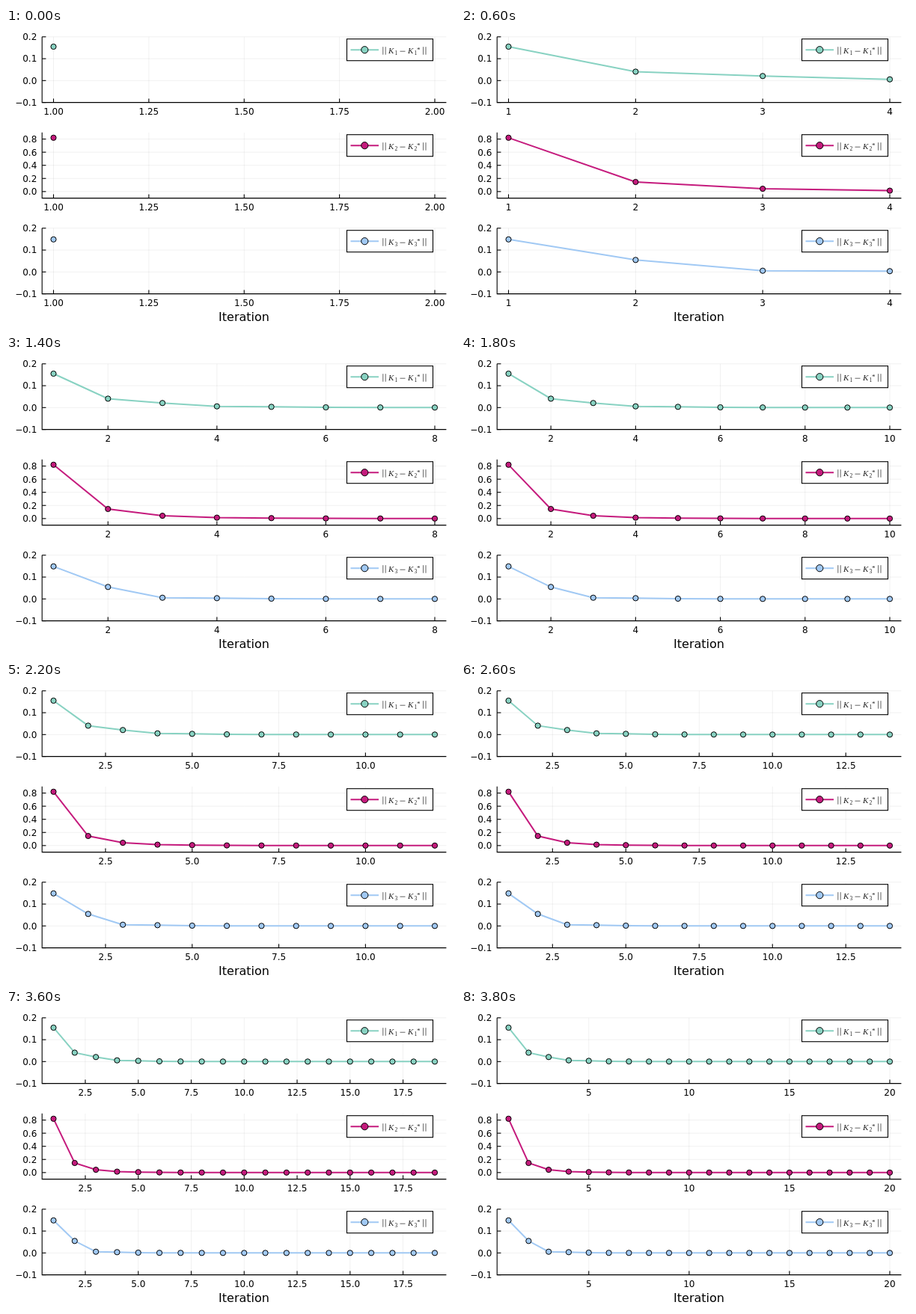
An HTML page with a canvas that plays this animation: 600 px wide and 400 px high, repeating every 4 s.

```html
<!DOCTYPE html>
<html lang="en">
<head>
<meta charset="utf-8">
<title>Convergence</title>
<style>
  html, body { margin: 0; width: 100%; height: 100%; overflow: hidden; background: #fff; }
  canvas { display: block; }
</style>
</head>
<body>
<canvas id="stage" width="600" height="400"></canvas>
<script>
const ctx = document.getElementById('stage').getContext('2d');
const LEFT = 48.2, RIGHT = 588.4, FIRST = 63.5, LAST = 573, HEIGHT = 87.8;
const STEP_MS = 200, COUNT = 20;
const LABEL = '12px "DejaVu Sans", sans-serif';
const AXIS = '#000', GRID = 'rgba(0,0,0,0.06)';

const plots = [
  { top: 11.8, color: '#88d2c2', min: -0.1, max: 0.2, ticks: [-0.1, 0, 0.1, 0.2],
    values: [0.155, 0.0407, 0.0208, 0.0056, 0.0034, 0.0011] },
  { top: 139.8, color: '#c51b7d', min: -0.1, max: 0.9, ticks: [0, 0.2, 0.4, 0.6, 0.8],
    values: [0.82, 0.146, 0.043, 0.014, 0.0068, 0.0025] },
  { top: 267.8, color: '#a1c9f4', min: -0.1, max: 0.2, ticks: [-0.1, 0, 0.1, 0.2],
    values: [0.1487, 0.0548, 0.0055, 0.0035, 0.0013, 0.0004] }
];

// Errors keep shrinking geometrically after the listed ones.
const valueAt = (values, i) => values[i] ?? values[5] * 0.5 ** (i - 5);

function tickStep(n) {
  if (n < 3) return 0.25;
  if (n < 4) return 0.5;
  if (n < 8) return 1;
  if (n < 12 || n === 15) return 2;
  if (n < 15 || n === 18 || n === 19) return 2.5;
  return n < 18 ? 3 : 5;
}

function line(points, color, width) {
  ctx.beginPath();
  points.forEach(([x, y]) => ctx.lineTo(x, y));
  ctx.strokeStyle = color;
  ctx.lineWidth = width;
  ctx.stroke();
}

function dot(x, y, r, color) {
  ctx.beginPath();
  ctx.arc(x, y, r, 0, 2 * Math.PI);
  ctx.fillStyle = color;
  ctx.fill();
  ctx.strokeStyle = '#000';
  ctx.lineWidth = 1;
  ctx.stroke();
}

function text(str, x, y, font, align = 'center', color = '#000') {
  ctx.font = font;
  ctx.textAlign = align;
  ctx.fillStyle = color;
  ctx.fillText(str, x, y);
}

function legend(top, color, index) {
  const y = top + 17.4, base = y + 4.9, ink = '#222';
  const serif = (size, style = '') => `${style} ${size}px "Liberation Serif", serif`;
  const put = (str, x, dy, font) => text(str, x, base + dy, font, 'left', ink);
  ctx.fillStyle = '#fff';
  ctx.fillRect(455.5, y - 14.5, 115, 29);
  ctx.strokeStyle = '#000';
  ctx.lineWidth = 1.1;
  ctx.strokeRect(455.5, y - 14.5, 115, 29);
  line([[460.5, y], [498, y]], color, 2);
  dot(479.3, y, 4.6, color);
  for (const x of [503.8, 507.2, 557.6, 561]) line([[x, y - 4], [x, y + 6.5]], ink, 0.7);
  for (const x of [511, 537]) {
    put('K', x, 0, serif(11, 'italic'));
    put(index, x + 8.6, 2.2, serif(7.5));
  }
  line([[526.5, y + 2], [533.5, y + 2]], ink, 0.7);
  put('*', 549, -2.2, serif(9));
}

function drawPlot({ top, color, min, max, ticks, values }, index, n) {
  const bottom = top + HEIGHT, end = Math.max(n, 2), step = tickStep(n);
  const px = v => FIRST + (v - 1) / (end - 1) * (LAST - FIRST);
  const py = v => bottom - (v - min) / (max - min) * HEIGHT;
  const digits = step === 0.25 ? 2 : step % 1 ? 1 : 0;
  const xs = [];
  for (let v = Math.ceil(1 / step) * step; v <= end; v += step) xs.push(v);

  xs.forEach(v => line([[px(v), top], [px(v), bottom]], GRID, 1));
  ticks.forEach(v => line([[LEFT, py(v)], [RIGHT, py(v)]], GRID, 1));
  line([[LEFT, top], [LEFT, bottom], [RIGHT, bottom]], AXIS, 1.1);
  for (const v of xs) {
    line([[px(v), bottom], [px(v), bottom - 5.2]], AXIS, 1.1);
    text(v.toFixed(digits), px(v), bottom + 16, LABEL);
  }
  for (const v of ticks) {
    line([[LEFT, py(v)], [LEFT + 5.2, py(v)]], AXIS, 1.1);
    text(v.toFixed(1).replace('-', '\u2212'), 41.3, py(v) + 4.4, LABEL, 'right');
  }

  const points = Array.from({ length: n }, (_, i) => [px(i + 1), py(valueAt(values, i))]);
  line(points, color, 2);
  points.forEach(([x, y]) => dot(x, y, 3.6, color));
  legend(top, color, index + 1);
}

function draw() {
  const n = Math.floor(performance.now() / STEP_MS) % COUNT + 1;
  ctx.fillStyle = '#fff';
  ctx.fillRect(0, 0, 600, 400);
  plots.forEach((plot, i) => drawPlot(plot, i, n));
  text('Iteration', 318, 392, '16px "DejaVu Sans", sans-serif');
  requestAnimationFrame(draw);
}
draw();
</script>
</body>
</html>
```
